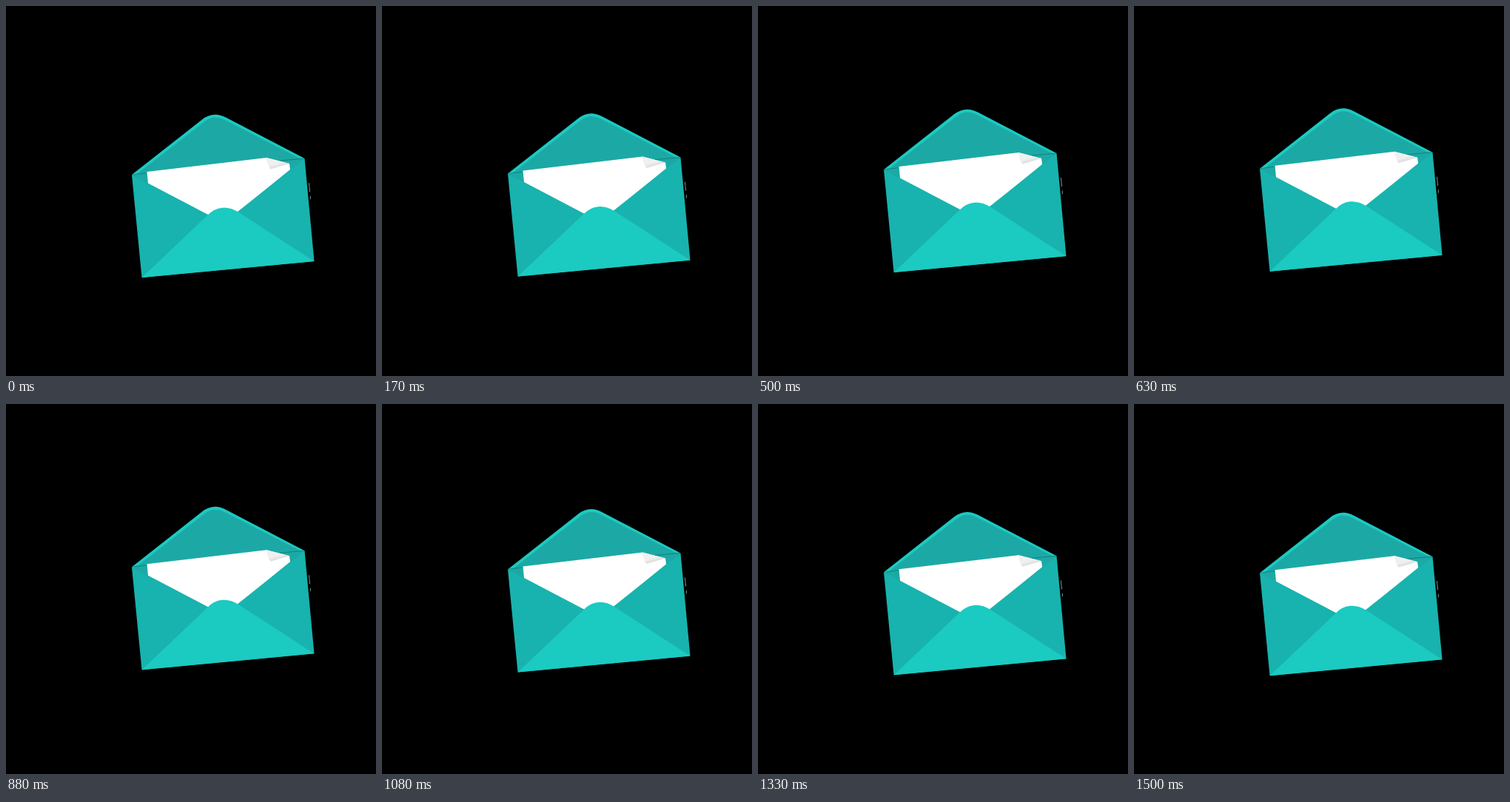
An HTML page that plays this animation: 500x500 px, repeating every 1540 ms.

```html
<!DOCTYPE html>
<html lang="en">
<head>
<meta charset="utf-8">
<title>Floating envelope</title>
<style>
  html, body { margin: 0; height: 100%; overflow: hidden; background: #000; }
  svg { display: block; width: 100vw; height: 100vh; }
</style>
</head>
<body>
<svg viewBox="0 0 500 500">
  <defs>
    <linearGradient id="curl" gradientUnits="userSpaceOnUse" x1="365" y1="207" x2="368" y2="218">
      <stop offset=".5" stop-color="#f0f0f0"/>
      <stop offset="1" stop-color="#d9dcdc"/>
    </linearGradient>
  </defs>
  <g id="envelope">
    <!-- open flap and inside -->
    <path fill="#1bcac1" d="M170 228 L265 153.300 Q280 141.500 297 150.500 L403.500 206 L300 290Z"/>
    <path fill="#1ca9a5" d="M171 229 L177 227 L268 156.300 Q281 146 296 154 L398 206.300 L403.500 206.500 L313 279 L273 283Z"/>
    <path fill="none" stroke="#0c706e" stroke-width=".7" d="M171 227.800 L190 225.500 M369 209 L403 206"/>
    <!-- letter -->
    <path fill="#fff" d="M190.500 224 L352 205 L383 213 L384 221 L313 279 L295 290 L273 282.500 L192 240Z"/>
    <path fill="url(#curl)" d="M352 205 L383 213 L357.500 220.500 Q353 215 352 205Z"/>
    <!-- pocket -->
    <path fill="#18b3ae" d="M170 228 L273 282 L295 300 L313 278 L403.500 206 L416.500 345 L183.500 367Z"/>
    <path fill="#1bcac1" d="M183.500 367 L272 283 Q281 273.500 292 272.600 Q303 271.500 314 278.500 L416.500 345Z"/>
    <path fill="none" stroke="#a9d8d5" stroke-width=".7" d="M409.300 239 L410.600 251 M411.300 256.500 V261"/>
  </g>
</svg>
<script>
  const STEPS = 37, FPS = 24;
  const envelope = document.getElementById('envelope');

  function draw(now) {
    const step = Math.floor((now % 1540 + 4) / 1000 * FPS) % STEPS;
    const y = 4.4 * Math.cos(2 * Math.PI * (step + 1.2) / STEPS) - 4.2;
    envelope.setAttribute('transform', `translate(0 ${y.toFixed(2)})`);
    requestAnimationFrame(draw);
  }
  draw(0);
</script>
</body>
</html>
```
